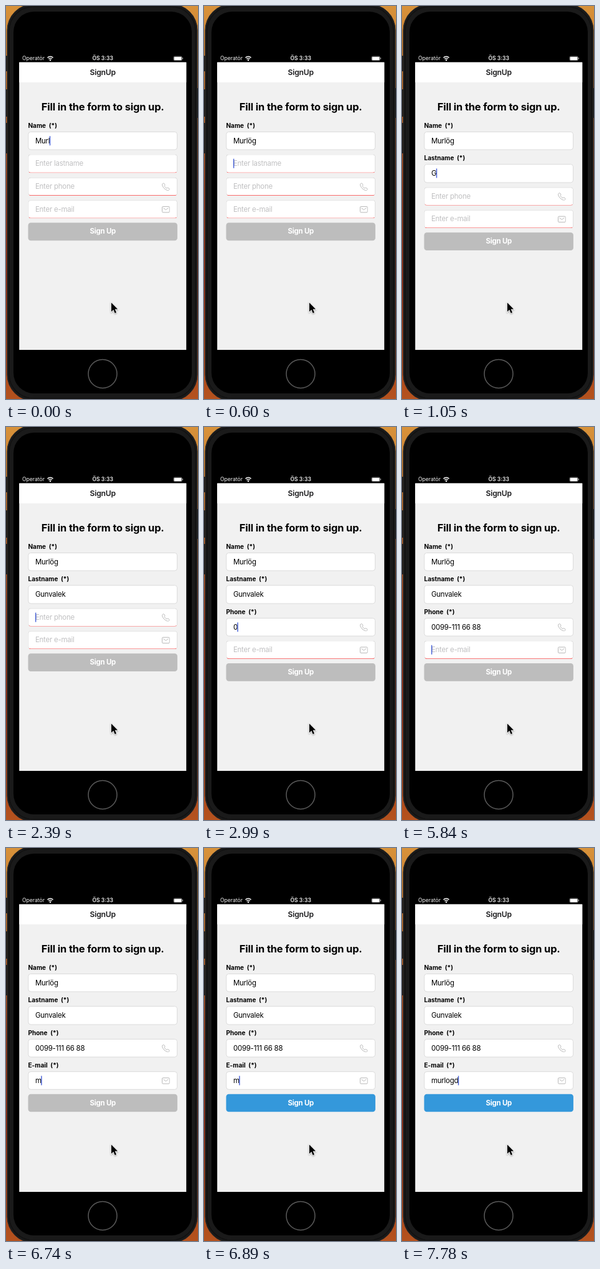
An HTML page for the animation above (8 s loop, 308 by 632 pixels).

```html
<!DOCTYPE html>
<html lang="tr">
<head>
<meta charset="utf-8">
<title>SignUp</title>
<style>
  html, body { margin: 0; width: 100%; height: 100%; overflow: hidden; background: #111; }
  body { position: relative; }
  svg { display: block; fill: none; }
  .layer { position: absolute; left: 0; top: 0; }
  /* The app is laid out 375 points wide and scaled down into the phone. */
  #screen { position: absolute; left: 0; top: 0; width: 375px; height: 647px; background: #f1f1f1;
    transform-origin: 0 0; transform: translate(21.2px, 90.6px) scale(.7147);
    font: 16px Inter, sans-serif; letter-spacing: -.02em; }
  .line { position: absolute; left: 0; width: 100%; line-height: 28px; text-align: center; white-space: pre; }
  .status { top: -23px; color: #f4f4f4; font-size: 12px; letter-spacing: 0; }
  .carrier { left: 6.7px; text-align: left; }
  .header { top: 0; height: 45px; background: #fff; line-height: 46px; font-size: 17px; font-weight: 600; color: #1c1c1e; }
  .heading { top: 86px; font-size: 23px; font-weight: 700; letter-spacing: -.01em; }
  #form { position: absolute; left: 20px; top: 134.3px; width: 335px; }
  .label { height: 22px; line-height: 16px; font-size: 14px; font-weight: 700; letter-spacing: 0; white-space: pre; }
  .field { position: relative; box-sizing: border-box; height: 41.2px; margin-bottom: 10px; padding-left: 15px;
    line-height: 39.2px; white-space: pre; background: #fff; border: 1px solid #cfcfcf; border-radius: 6px; }
  .empty { color: #c0c0c2; border-bottom-color: #fa3c3c; }
  .caret { position: absolute; top: 9px; width: 2px; height: 21px; background: #4560d8; }
  .field svg { position: absolute; left: 299px; top: 11px; stroke: #b0b0b0; stroke-width: .9; }
  #button { height: 39.6px; line-height: 39.6px; border-radius: 6px; text-align: center; font-weight: 700; color: #fff; }
</style>
</head>
<body>
<svg class="layer" width="308" height="632">
  <defs>
    <linearGradient id="wall" x2="0" y2="1">
      <stop stop-color="#d8923a"/>
      <stop offset=".2" stop-color="#c0702c"/>
      <stop offset=".5" stop-color="#9a3a1c"/>
      <stop offset=".7" stop-color="#9c3014"/>
      <stop offset="1" stop-color="#b4521e"/>
    </linearGradient>
  </defs>
  <rect width="308" height="632" fill="url(#wall)"/>
  <path d="M.8 80v25M.8 134v44M.8 188v49M307.4 132v48" stroke="#161616" stroke-width="2"/>
  <rect x="2" y="-3" width="305" height="638" rx="42" fill="#1a1a1a" stroke="#262626"/>
  <rect x="5" y="1" width="299" height="630" rx="39" stroke="#111" stroke-width="1.5"/>
  <rect x="12" y="9" width="286" height="614" rx="33" fill="#000"/>
  <circle cx="155" cy="591.5" r="23" stroke="#5a5a5a" stroke-width="1.5"/>
  <g stroke="#fff" stroke-width="1.5">
    <path d="M66.5 83.2a6.2 6.2 0 0 1 9 0M68.4 85.3a3.7 3.7 0 0 1 5.2 0"/>
    <circle cx="71" cy="87" r=".5"/>
  </g>
  <rect x="268.9" y="81" width="13.4" height="6.6" rx="1.7" stroke="#999" stroke-width=".7"/>
  <rect x="269.6" y="81.7" width="12" height="5.2" rx="1" fill="#fff"/>
  <path d="M283.5 83.2v2.2" stroke="#aaa"/>
</svg>

<main id="screen">
  <div class="line status carrier">Operatör</div>
  <div class="line status" style="font-weight:600">ÖS 3:33</div>
  <div class="line header">SignUp</div>
  <div class="line heading">Fill in the form to sign up.</div>
  <div id="form"></div>
</main>

<svg class="layer" width="308" height="632">
  <path d="M168.9 477v14.8l3.4-3.2 2.4 5.3 2.4-1-2.4-5.3h4.5z" fill="#000" stroke="#fff" stroke-width="1.6"
    style="paint-order:stroke;filter:drop-shadow(0 1px 1px #0005)"/>
</svg>

<script>
const LOOP = 8000;
const BUTTON_ACTIVE_AT = 6890;

const phoneIcon = '<path d="M3.4.8C2.9.4 2.3.6 1.5 1.3.3 2.5.5 4.3 2.2 6.9 3.4 8.7 4.6 9.9 6.4 11c2.6 1.5 4.2 1.6 5.3.5.8-.8.9-1.3.5-1.8C11.6 9 10.6 8.4 9.7 8 9.1 7.8 8.6 8.6 8 8.8 7 8.8 4.3 6.1 4.3 5.2 4.5 4.5 5.3 4.1 5 3.4 4.7 2.5 4 1.3 3.4.8z"/>';
const mailIcon = '<rect x=".6" y="1.8" width="11.8" height="9.4" rx="1.4"/><path d="M2.6 4.1l3.9 3 3.9-3"/>';

const fields = [
  { label: 'Name', value: 'Murlög', icon: '' },
  { label: 'Lastname', value: 'Gunvalek', icon: '' },
  { label: 'Phone', value: '0099-111 66 88', icon: phoneIcon },
  { label: 'E-mail', value: 'murlogd', icon: mailIcon },
];

// Per field: [time, number of typed characters]
const typing = [
  [[0, 4], [150, 6]],
  [[600, 0], [1050, 1], [1500, 2], [1650, 3], [1800, 4], [1940, 5], [2090, 6], [2240, 8]],
  [[2390, 0], [2990, 1], [3290, 2], [3590, 3], [3740, 4], [3890, 5], [4190, 6], [4340, 7],
   [4490, 8], [4790, 9], [4940, 10], [5090, 11], [5390, 13], [5540, 14]],
  [[5840, 0], [6740, 1], [7030, 2], [7180, 3], [7330, 4], [7480, 6], [7780, 7]],
];

const form = document.getElementById('form');

function add(className) {
  const element = document.createElement('div');
  element.className = className;
  return form.appendChild(element);
}

for (const field of fields) {
  field.labelBox = add('label');
  field.labelBox.textContent = field.label + '  (*)';
  field.box = add('field');
  field.box.innerHTML = '<span></span><i class="caret"></i>' +
    (field.icon && `<svg width="18.2" height="18.2" viewBox="0 0 13 13">${field.icon}</svg>`);
  [field.text, field.caret] = field.box.children;
}
const button = add('');
button.id = 'button';
button.textContent = 'Sign Up';

function draw(time) {
  const focus = typing.findLastIndex(keys => time >= keys[0][0]);
  const blinkOff = time >= 6290 && time < 6440;

  fields.forEach((field, i) => {
    const key = typing[i].findLast(([start]) => time >= start);
    const typed = field.value.slice(0, key ? key[1] : 0);
    field.text.textContent = typed || 'Enter ' + field.label.toLowerCase();
    field.box.classList.toggle('empty', !typed);
    field.labelBox.hidden = !typed;
    field.caret.hidden = i !== focus || blinkOff;
    field.caret.style.left = 15 + (typed ? field.text.offsetWidth - 1 : 0) + 'px';
  });
  button.style.background = time >= BUTTON_ACTIVE_AT ? '#3498db' : '#bdbdbd';
}

function tick() {
  draw(performance.now() % LOOP);
  requestAnimationFrame(tick);
}
tick();
</script>
</body>
</html>
```
